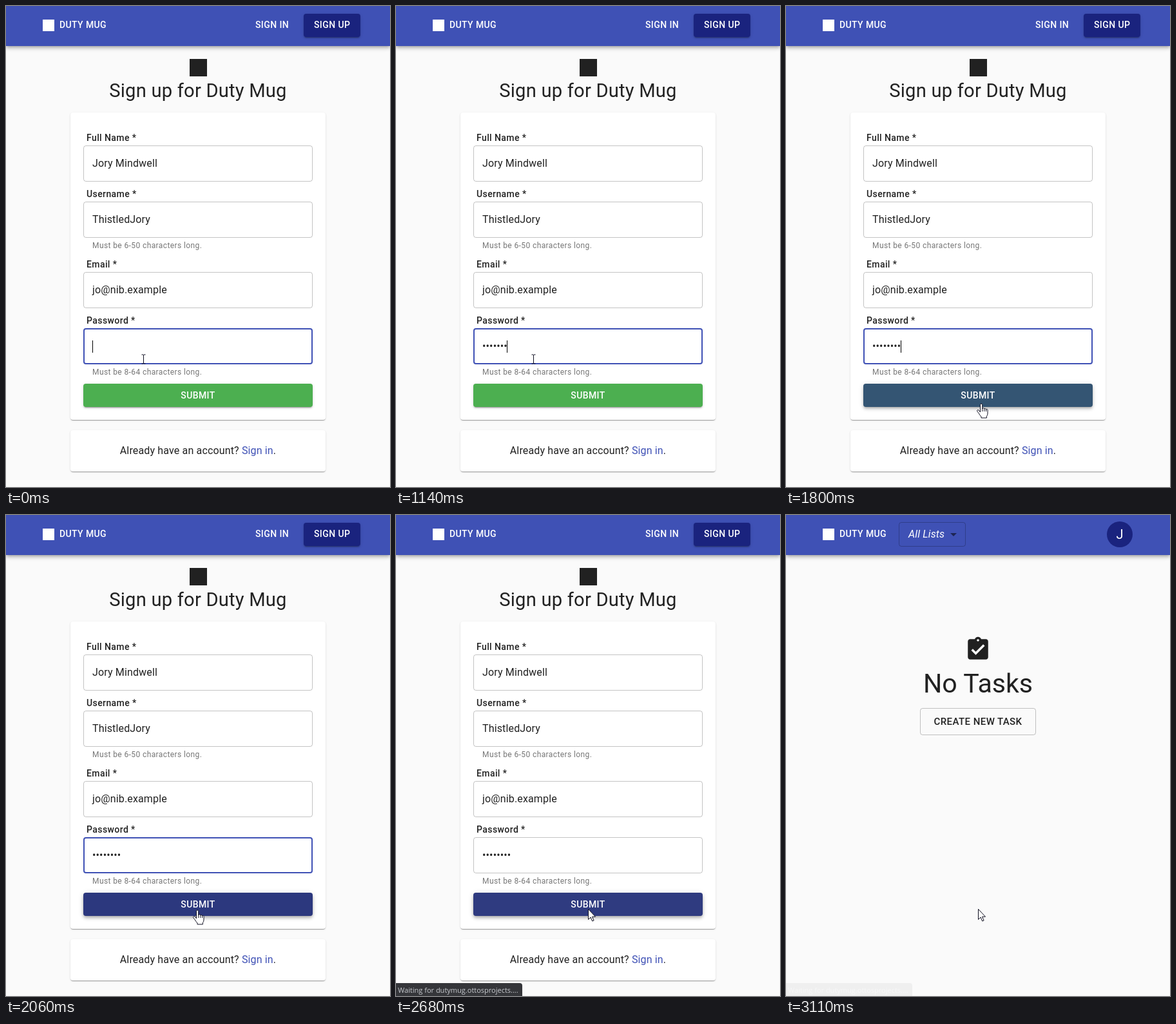
Animation of 596x745 px, one loop 3280 ms. Source, as an HTML page:

```html
<!DOCTYPE html>
<html lang="en">
<head>
<meta charset="utf-8">
<title>Duty Mug</title>
<style>
  html, body { margin: 0; width: 100%; height: 100%; overflow: hidden; background: #fafafa; }
  body { position: relative; font: 16px/20px Roboto, sans-serif; letter-spacing: .15px; color: #212121; }
  div, svg { position: absolute; box-sizing: border-box; white-space: pre; }
  .layer { left: 0; top: 0; width: 596px; height: 745px; }
  .mid { left: 0; width: 596px; text-align: center; }
  .bar { left: 0; top: 0; width: 596px; height: 62px; background: #3f51b5;
    box-shadow: 0 2px 4px -1px #0003, 0 4px 5px #00000024, 0 1px 10px #0000001f; }
  .cap, .label { font-size: 14px; font-weight: 500; letter-spacing: .4px; }
  .cap { color: #fff; }
  .label { left: 125px; }
  .hint { left: 134px; font-size: 12px; letter-spacing: .4px; color: #757575; }
  .value { left: 134px; }
  .card { left: 100px; width: 396px; background: #fff; border-radius: 4px;
    box-shadow: 0 2px 1px -1px #0003, 0 1px 1px #00000024, 0 1px 3px #0000001f; }
  .field { left: 120px; width: 356px; height: 56px; border: 1px solid #0000003b; border-radius: 4px; }
  .focus { border: 2px solid #3f51b5; }
  .outline { border: 1px solid #0000003b; border-radius: 4px; }
  #join { left: 462px; top: 12px; width: 88px; height: 36px; border-radius: 4px; background: #1a237e;
    box-shadow: 0 3px 1px -2px #0003, 0 2px 2px #00000024, 0 1px 5px #0000001f; }
  #submit { left: 120px; top: 585px; width: 356px; height: 36px; border-radius: 4px; overflow: hidden; }
  #ripple { left: -8px; top: -158px; width: 370px; height: 370px; border-radius: 50%; background: #fff; }
  #caret { top: 518px; width: 1px; height: 19px; background: #000; }
  #status { left: 0; top: 725px; width: 196px; height: 20px; padding-left: 3px; border-radius: 0 4px 0 0;
    background: #35363a; color: #c8cbd0; font: 11px/21px "Open Sans", sans-serif; letter-spacing: 0; }
  #pointer { left: 0; top: 0; overflow: visible; fill: #fff; stroke: #112; }
</style>
</head>
<body>
<div class="bar"></div>
<div style="left:57px;top:21px;width:18px;height:18px;background:#fff"></div>
<div class="cap" style="left:83px;top:19px">DUTY MUG</div>

<div id="form" class="layer">
  <div class="cap" style="left:387px;top:19px">SIGN IN</div>
  <div id="join"></div>
  <div class="cap" style="left:478px;top:19px">SIGN UP</div>
  <div style="left:285px;top:82px;width:27px;height:27px;background:#212121"></div>
  <div class="mid" style="top:121px;font-size:29.15px;letter-spacing:.21px">Sign up for Duty Mug</div>
  <div class="card" style="top:165px;height:476px"></div>
  <div class="label" style="top:194px">Full Name *</div>
  <div class="field" style="top:216px"></div>
  <div class="value" style="top:234px">Jory Mindwell</div>
  <div class="label" style="top:281px">Username *</div>
  <div class="field" style="top:303px"></div>
  <div class="value" style="top:321px">ThistledJory</div>
  <div class="hint" style="top:361px">Must be 6-50 characters long.</div>
  <div class="label" style="top:390px">Email *</div>
  <div class="field" style="top:412px"></div>
  <div class="value" style="top:430px">jo@nib.example</div>
  <div class="label" style="top:477px">Password *</div>
  <div id="password" class="field" style="top:499px"></div>
  <div id="dots" class="value" style="top:517px"></div>
  <div id="caret"></div>
  <div class="hint" style="top:557px">Must be 8-64 characters long.</div>
  <div id="submit"><div id="ripple"></div></div>
  <div class="mid cap" style="top:593px">SUBMIT</div>
  <div class="card" style="top:657px;height:64px"></div>
  <div class="mid" style="top:679px">Already have an account? <span style="color:#3f51b5">Sign in</span>.</div>
</div>

<div id="home" class="layer">
  <div class="outline" style="left:175px;top:11px;width:104px;height:38px"></div>
  <div style="left:190px;top:20px;color:#fff;font-style:italic">All Lists</div>
  <svg style="left:255px;top:28px" width="10" height="5"><path d="M0 0h10L5 5z" fill="#0000008a"/></svg>
  <div style="left:498px;top:10px;width:40px;height:40px;border-radius:50%;background:#1a237e;color:#fff;font-size:20px;line-height:40px;text-align:center">J</div>
  <div id="empty" class="layer">
    <svg style="left:277px;top:187px" width="42" height="42" viewBox="0 0 24 24" fill="#212121"><path d="M19 3h-4.18C14.4 1.84 13.3 1 12 1s-2.4.84-2.82 2H5c-1.1 0-2 .9-2 2v14c0 1.1.9 2 2 2h14c1.1 0 2-.9 2-2V5c0-1.1-.9-2-2-2zm-7 0c.55 0 1 .45 1 1s-.45 1-1 1-1-.45-1-1 .45-1 1-1zm-2 14l-4-4 1.41-1.41L10 14.17l6.59-6.59L18 9l-8 8z"/></svg>
    <div class="mid" style="top:251px;font-size:41.13px;letter-spacing:0">No Tasks</div>
    <div class="outline" style="left:208px;top:299px;width:180px;height:42px"></div>
    <div class="mid" style="top:310px;font-size:15px;font-weight:500;letter-spacing:.43px">CREATE NEW TASK</div>
  </div>
</div>

<div id="status">Waiting for dutymug.ottosprojects....</div>
<svg id="pointer" width="1" height="1">
  <path id="beam" fill="none" d="M-3-6.5h2.5l.5.5.5-.5H3M0-6V7M-3 7.5h2.5L0 7l.5.5H3"/>
  <path id="arrow" d="M.5.5v16l3.6-3.5 2.6 6 2.4-1-2.6-5.8h5z"/>
  <path id="hand" d="M-1.5 13V1.6a1.6 1.6 0 0 1 3.2 0V8a1.5 1.5 0 0 1 3 .4a1.5 1.5 0 0 1 2.8.6a1.4 1.4 0 0 1 2.5 1V15q0 3-1.6 4.5V22H0V20Q-2.5 17.5-4 14.5L-6.3 11.6a1.5 1.5 0 0 1 2.2-1.8zM1.7 8v4M4.7 8.4V12M7.5 9v3"/>
</svg>

<script>
const LOOP = 3280, HOVER = 1680, PRESS = 2185, RELEASE = 2280, WAIT = 2520, SWAP = 2730;
const KEYS = [320, 420, 590, 670, 830, 960, 1140, 1320];
const $ = id => document.getElementById(id);
const show = (id, on) => $(id).style.display = on ? '' : 'none';
const span = (t, start, length) => Math.min(1, Math.max(0, (t - start) / length));
const mix = (a, b, p) => a + (b - a) * p;

// cubic-bezier(.4, 0, .2, 1)
function ease(x) {
  let lo = 0, hi = 1;
  for (let i = 0; i < 20; i++) {
    const s = (lo + hi) / 2, r = 1 - s;
    if (1.2 * r * r * s + .6 * r * s * s + s ** 3 < x) lo = s; else hi = s;
  }
  return 3 * (1 - lo) * lo * lo + lo ** 3;
}

function drawPassword(t) {
  const typed = KEYS.filter(k => k <= t).length;
  $('dots').textContent = '•'.repeat(typed);
  $('caret').style.left = Math.floor(134 + 5.54 * typed) + 'px';
  show('caret', t < 170 || (t >= KEYS[0] && t < 1820));
  $('password').classList.toggle('focus', t < PRESS);
}

function drawSubmit(t) {
  const h = ease(span(t, HOVER, 250));
  const style = $('submit').style;
  style.background = `rgb(${mix(76, 44, h)}, ${mix(175, 56, h)}, ${mix(80, 126, h)})`;
  style.boxShadow = `0 ${3 - h}px ${1 + 3 * h}px ${h - 2}px #0003, ` +
    `0 ${2 + 2 * h}px ${2 + 3 * h}px #00000024, 0 1px ${5 + 5 * h}px #0000001f`;
  const grow = ease(span(t, PRESS, 550)), fade = ease(span(t, RELEASE, 550));
  $('ripple').style.transform = `scale(${grow})`;
  $('ripple').style.opacity = t < PRESS ? 0 : mix(.1, .3, grow) * (1 - fade);
}

function drawPointer(t) {
  const flick = span(t, 1530, 200) ** 2, drift = ease(span(t, 1735, 320));
  let x = mix(mix(213, 304, flick), 297, drift);
  let y = mix(mix(546, 617, flick), 612, drift);
  if (t >= WAIT) { x = 298; y = 610; }
  const kind = t >= WAIT ? 'arrow' : y < 555 ? 'beam' : y < 585 ? 'arrow' : 'hand';
  for (const id of ['beam', 'arrow', 'hand']) show(id, id === kind);
  const snap = v => Math.round(v) + (kind === 'beam' ? .5 : 0);
  $('pointer').style.transform = `translate(${snap(x)}px, ${snap(y)}px)`;
}

function draw(now) {
  const t = now % LOOP;
  show('form', t < SWAP);
  show('home', t >= SWAP);
  drawPassword(t);
  drawSubmit(t);
  drawPointer(t);
  $('empty').style.opacity = ease(span(t, SWAP, 230));
  $('status').style.opacity = span(t, WAIT, 100) * (1 - .95 * span(t, 2930, 180));
}

const begin = performance.now();
function tick() {
  draw(performance.now() - begin);
  requestAnimationFrame(tick);
}
tick();
</script>
</body>
</html>
```
